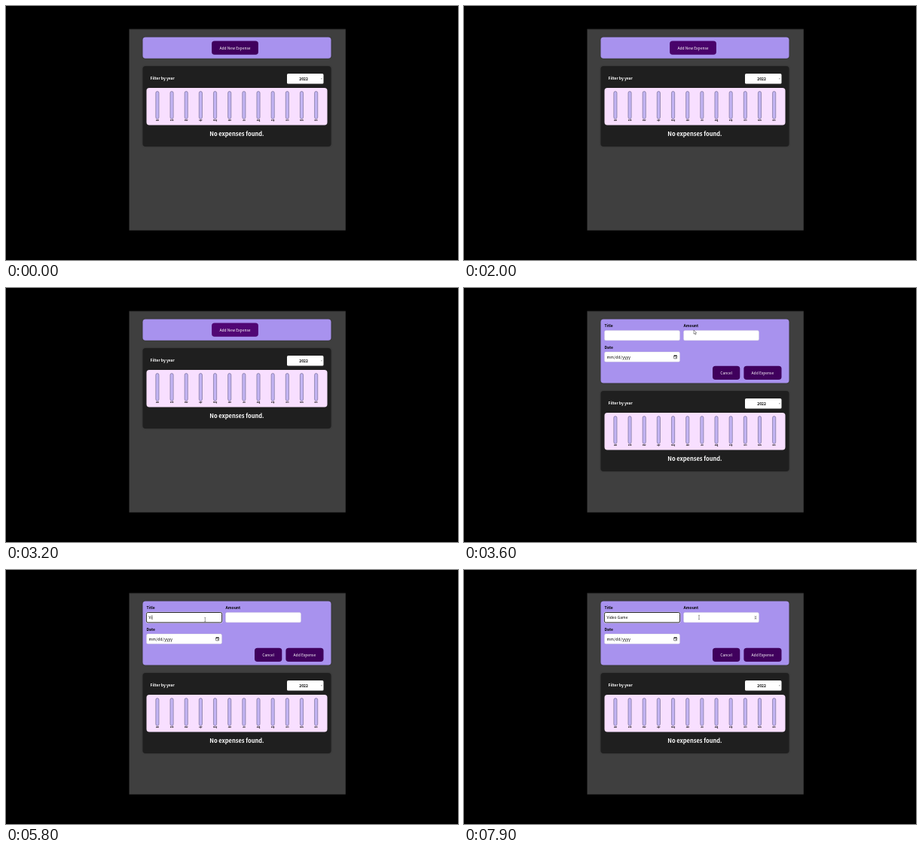
These frames come from a looping animation (600 px wide and 338 px high, 8000 ms). An HTML page:

```html
<!DOCTYPE html>
<html lang="en">
<head>
<meta charset="utf-8">
<title>Expense form</title>
<style>
  html, body { margin: 0; width: 100%; height: 100%; overflow: hidden; background: #000; }
  svg { display: block; width: 600px; height: 338px; }
  text { font: 5px "Noto Sans CJK JP", "Noto Sans CJK", "Noto Sans", sans-serif; white-space: pre; }
  .bold { font-weight: 700; }
  .mid { text-anchor: middle; }
  .light { fill: #fff; }
  .card { filter: drop-shadow(0 .3px 1.3px rgba(0, 0, 0, .25)); }
  .btn { fill: #40005d; }
  .input { fill: #fff; stroke: #ccc; stroke-width: .3; }
  .bar { fill: #c3b4f3; stroke: #313150; stroke-width: .4; }
  .month { font-size: 2.5px; font-weight: 700; }
  .heading { font-size: 7.5px; font-weight: 700; }
</style>
</head>
<body>
<svg viewBox="0 0 600 338">
  <rect x="163.5" y="30.8" width="287.3" height="267.8" fill="#3f3f3f"/>
  <rect x="163.5" y="30.6" width="287.3" height=".7" fill="#262626"/>

  <rect id="top" class="card" x="181.5" y="41.5" width="250" height="28.2" rx="3.75" fill="#a892ee"/>

  <g id="closed">
    <rect id="add" class="btn" x="273.1" y="46.6" width="61.8" height="18.2" rx="3.75"/>
    <text class="mid light" x="304" y="57.6">Add New Expense</text>
  </g>

  <g id="form">
    <text class="bold" x="186.5" y="52.3">Title</text>
    <text class="bold" x="291.5" y="52.3">Amount</text>
    <text class="bold" x="186.5" y="80.7">Date</text>
    <rect class="input" x="186.5" y="56.6" width="100" height="13.2" rx="1.9"/>
    <rect class="input" x="291.5" y="56.6" width="100" height="13.2" rx="1.9"/>
    <rect class="input" x="186.5" y="85.1" width="100" height="13.2" rx="1.9"/>
    <text x="189.5" y="93.6">mm<tspan dx=".4">/</tspan><tspan dx=".4">dd</tspan><tspan dx=".4">/</tspan><tspan dx=".4">yyyy</tspan></text>
    <g fill="none" stroke="#111" stroke-width=".5">
      <rect x="278.6" y="89.9" width="4" height="4" rx=".3"/>
      <path d="M278.6 90.6h4M279.6 89.2v.8M281.6 89.2v.8" stroke-width=".9"/>
      <path d="M280.9 92.7h1" stroke-width="1"/>
    </g>
    <rect class="btn" x="330" y="103.7" width="36.3" height="18.2" rx="3.75"/>
    <text class="mid light" x="348.1" y="114.7">Cancel</text>
    <rect class="btn" x="371.4" y="103.7" width="50.1" height="18.2" rx="3.75"/>
    <text class="mid light" x="396.4" y="114.7">Add Expense</text>
    <g id="focus" fill="none">
      <rect x="186.2" y="56.3" width="100.6" height="13.8" rx="2.1" stroke="#fff" stroke-width="1.2"/>
      <rect x="186.4" y="56.5" width="100.2" height="13.4" rx="1.9" stroke="#101010" stroke-width=".9"/>
    </g>
    <text id="typed" x="189.5" y="65"></text>
    <rect id="caret" y="60.2" width=".45" height="6.2"/>
    <g id="spin">
      <rect x="385" y="60.4" width="4" height="5.8" fill="#ececec"/>
      <path d="M386 62.7l1-1.3 1 1.3zM386 63.9l1 1.3 1-1.3z" fill="#444"/>
    </g>
  </g>

  <g id="list">
    <rect class="card" x="181.5" y="80" width="250" height="107" rx="3.75" fill="#1f1f1f"/>
    <text class="bold light" x="191.5" y="97.6">Filter by year</text>
    <rect x="373" y="90.1" width="48.5" height="13.4" rx="1.6" fill="#fff"/>
    <text class="bold mid" x="395.1" y="98.8">2022</text>
    <rect id="drop" x="416.7" y="90.3" width="4.5" height="13" fill="#c9c9c9" stroke="#8c8c8c" stroke-width=".4"/>
    <path d="M417.9 96.4h2l-1 1.2z" fill="#555"/>
    <rect x="186.5" y="108.9" width="240" height="49.7" rx="3.75" fill="#f8dfff"/>
    <g id="chart"></g>
    <text class="heading mid light" x="306.4" y="173.4">No expenses found.</text>
  </g>

  <path id="arrow" d="M0 0v5.2l1.2-1.1.9 2 .9-.4-.9-1.9h1.7z" fill="#fff" stroke="#222" stroke-width=".45"/>
  <path id="beam" d="M-1-2.8h.6l.4.4.4-.4h.6M0-2.4v4.8M-1 2.8h.6l.4-.4.4.4h.6" fill="none" stroke="#333" stroke-width=".5"/>
</svg>
<script>
const LOOP = 8000, STEP = 100;
const $ = id => document.getElementById(id);
const show = (id, on) => $(id).setAttribute('visibility', on ? 'inherit' : 'hidden');
const place = (id, x, y) => $(id).setAttribute('transform', `translate(${x} ${y})`);
const within = (t, a, b) => t >= a && t < b;

$('chart').innerHTML = 'Jan Feb Mar Apr May Jun Jul Aug Sep Oct Nov Dec'.split(' ').map((m, i) => {
  const x = 200.9 + i * 19.16;
  return `<rect class="bar" x="${x - 2.1}" y="113.6" width="4.2" height="36.6" rx="2.1"/>
    <text class="month mid" x="${x}" y="153.2">${m}</text>`;
}).join('');

const title = 'Video\u00a0Game';
const keys = [5600, 5800, 5900, 6000, 6100, 6800, 6900, 7000, 7100, 7300];
const openAt = 3600, focusAt = 4400;

// Pointer stops: time, x, y; it glides between neighbours.
const stops = [
  [3600, 305, 56], [3700, 305, 60], [3900, 303, 63], [4100, 300, 63],
  [4400, 264.3, 66], [7700, 264.3, 66], [7900, 312, 63], [8000, 312, 63]
];

function pointer(t) {
  const i = Math.max(1, stops.findIndex(s => s[0] > t));
  const [a, ax, ay] = stops[i - 1], [b, bx, by] = stops[i];
  const k = (t - a) / (b - a);
  return [ax + (bx - ax) * k, ay + (by - ay) * k];
}

// The caret blinks every 500 ms and restarts at each key.
function caretOn(t, count) {
  const since = count ? keys[count - 1] : 4500;
  return t >= focusAt && (t < since || Math.floor((t - since) / 500) % 2 === 0);
}

function addColor(t) {
  if (within(t, 3200, openAt)) return '#510674';
  return within(t, 2000, 2100) || within(t, 3100, 3200) ? '#49036a' : '#40005d';
}

function draw(ms) {
  const t = Math.floor(ms % LOOP / STEP) * STEP;
  const open = t >= openAt;
  show('closed', !open);
  show('form', open);
  $('top').setAttribute('height', open ? 85.1 : 28.2);
  place('list', 0, open ? 57 : 0);
  show('drop', within(t, 1200, 1300));
  $('add').style.fill = addColor(t);

  const count = keys.filter(k => k <= t).length;
  $('typed').textContent = title.slice(0, count);
  const width = count ? $('typed').getComputedTextLength() : 0;
  $('caret').setAttribute('x', 189.5 + width);
  $('caret').setAttribute('visibility', open && caretOn(t, count) ? 'visible' : 'hidden');
  show('focus', t >= focusAt);

  const [x, y] = open ? pointer(t) : [0, 0];
  const inField = t >= 3700;
  place('arrow', x, y);
  place('beam', x, y);
  show('arrow', open && !inField);
  show('beam', open && inField);
  show('spin', inField && x > 291.5);
}

const start = performance.now();
function frame() {
  draw(performance.now() - start);
  requestAnimationFrame(frame);
}
frame();
</script>
</body>
</html>
```
